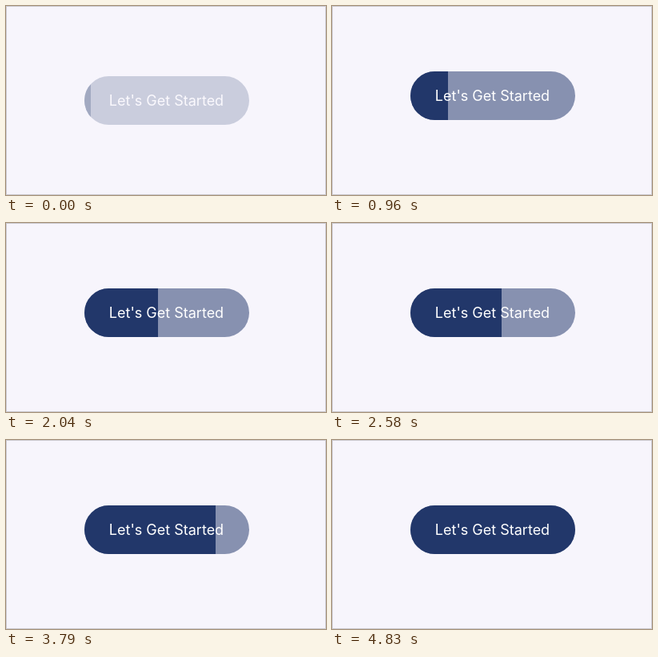
These frames come from a looping animation (400 px wide and 237 px high, 5460 ms). An HTML page:

```html
<!DOCTYPE html>
<html lang="en">
<head>
<meta charset="utf-8">
<style>
  html, body { margin: 0; width: 100%; height: 100%; overflow: hidden; }
  body { box-sizing: border-box; background: #f7f5fc; border: 1px solid #cbc9cf; }
  #button {
    position: absolute; left: 97.5px; top: 82px; width: 206px; height: 61px;
    border-radius: 31px; overflow: hidden; background: #8791b0;
    font: 18px/61px Inter, sans-serif; color: #fff; text-align: center; white-space: nowrap;
  }
  #fill { position: absolute; left: 0; top: 0; height: 100%; background: #22376a; }
  #label { position: relative; }
</style>
</head>
<body>
<div id="button"><div id="fill"></div><span id="label">Let's Get Started</span></div>
<script>
  const LOOP = 5460, FPS = 24, RISE = 10;
  const ENTER = 580, ENTER_LEAD = 130;
  const FILL = 5000, FILL_LEAD = 200;
  const button = document.getElementById('button');
  const fill = document.getElementById('fill');
  const clamp = x => Math.min(1, Math.max(0, x));
  const easeOut = x => 1 - (1 - x) ** 2;

  function draw(ms) {
    // Motion advances in 24 fps steps
    const t = Math.floor(ms * FPS / 1000 + 0.15) * 1000 / FPS;
    const shown = easeOut(clamp((t + ENTER_LEAD) / ENTER));
    button.style.opacity = shown;
    button.style.transform = `translateY(${RISE * (1 - shown)}px)`;
    fill.style.width = 100 * clamp((t + FILL_LEAD) / FILL) + '%';
  }

  function tick() {
    draw(performance.now() % LOOP);
    requestAnimationFrame(tick);
  }
  tick();
</script>
</body>
</html>
```
